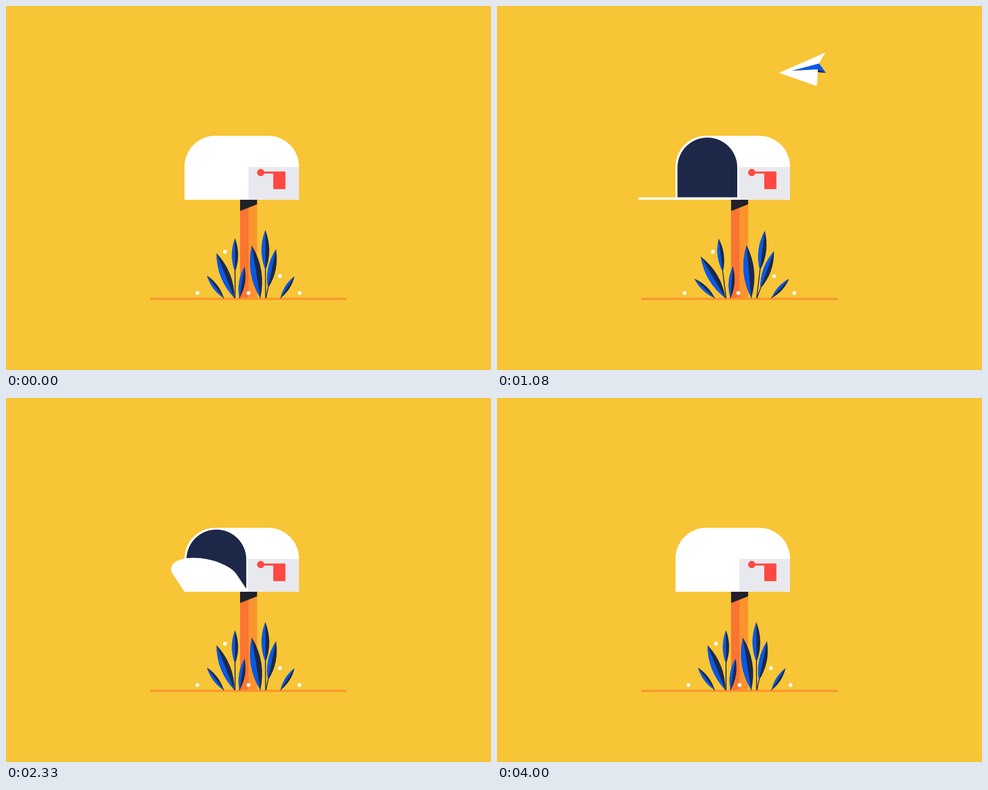
These frames come from a looping animation (864x648 px, 4.04 s). An HTML page with a canvas:

```html
<!DOCTYPE html>
<html lang="en">
<head>
<meta charset="utf-8">
<title>Mailbox</title>
<style>
  html, body { margin: 0; width: 100%; height: 100%; overflow: hidden; background: #f7c535; }
  canvas { display: block; }
</style>
</head>
<body>
<canvas id="stage" width="864" height="648"></canvas>
<script>
const ctx = document.getElementById('stage').getContext('2d');
const LOOP = 4040, GROUND = 520;
const YELLOW = '#f7c535', ORANGE = '#fb942f', RED = '#ff4842';
const BLUE = '#0759e8', NAVY = '#1d2849', WHITE = '#fff';

const rad = degrees => degrees * Math.PI / 180;
const ease = (t, from, to) => {
  const u = Math.min(1, Math.max(0, (t - from) / (to - from)));
  return u * u * (3 - 2 * u);
};

function fillPath(color, d) {
  ctx.fillStyle = color;
  ctx.fill(new Path2D(d));
}

function rect(color, x, y, w, h, radius = 0) {
  ctx.fillStyle = color;
  ctx.beginPath();
  ctx.roundRect(x, y, w, h, radius);
  ctx.fill();
}

function dot(color, x, y, r) {
  ctx.fillStyle = color;
  ctx.beginPath();
  ctx.arc(x, y, r, 0, 7);
  ctx.fill();
}

// Smooth curve through rows of [time, ...values]
function track(keys, t) {
  const last = keys.length - 1;
  const next = Math.max(1, keys.findIndex(k => k[0] >= t));
  const a = keys[next - 1], b = keys[next], span = b[0] - a[0];
  const u = (t - a[0]) / span;
  const slope = (k, c) => {
    const p = keys[Math.max(0, k - 1)], n = keys[Math.min(last, k + 1)];
    return (n[c] - p[c]) / (n[0] - p[0]) * span;
  };
  return [1, 2, 3].map(c => a[c] + ease(u, 0, 1) * (b[c] - a[c])
    + u * (1 - u) ** 2 * slope(next - 1, c) - u * u * (1 - u) * slope(next, c));
}

// time, x, y, heading
const FLIGHT = [
  [0, -75, 135, 18],
  [300, 340, 395, 30],
  [500, 589, 432, -18],
  [700, 760, 300, -75],
  [1080, 547, 115.5, -184.5],
  [1400, 260, 180, -198],
  [1560, 135, 238, -175],
  [1700, 57.5, 207, -47.3],
  [1900, 170, 170, 15],
  [2050, 315, 270, 28],
  [2160, 485, 305, 8]
];

// Nose at the origin, flying right; bank tilts it from a top view to a side view
function drawPlane(t) {
  const [x, y, heading] = track(FLIGHT, t);
  const flip = 1 - 2 * ease(t, 600, 1000);
  const bank = 1 - ease(t, 1080, 1700);
  const scale = .98 - .4 * ease(t, 1800, 2160);
  const upper = [-69 - 18 * bank, -29 - bank], lower = [-72 + 5 * bank, 30];
  const notch = [-71.5 - 2.5 * bank, -5 - 6 * bank], inner = [-71, 6.5 - 7 * bank];
  const keel = [-79 - 6 * bank, 6.7 * bank], fold = [-23, -1 - bank];
  ctx.save();
  ctx.translate(x, y);
  ctx.rotate(rad(heading));
  ctx.scale(scale, scale * flip);
  ctx.translate(45, 0);
  fillPath(BLUE, `M${fold}L${notch}L${keel}Z`);
  fillPath(NAVY, `M${fold}L${inner}L${keel}Z`);
  ctx.fillStyle = WHITE;
  ctx.beginPath();
  ctx.moveTo(0, 0);
  ctx.arcTo(...upper, ...notch, 3 * (1 - bank));
  ctx.lineTo(...notch);
  ctx.lineTo(...fold);
  ctx.lineTo(...inner);
  ctx.arcTo(...lower, 0, 0, 3);
  ctx.fill();
  ctx.restore();
}

// root x, tip x, tip y, share of the length that is bare stem
const LEAVES = [
  [388, 358, 480, 0], [407, 375, 440, 0], [408, 408, 413.5, .44], [416, 425, 464, 0],
  [453, 438, 426.5, 0], [462.5, 462, 399, .41], [463, 481, 433, .2], [489, 514, 481, 0]
];
const DOTS = [[390, 437.5], [341, 511], [432, 511], [488, 481], [523, 511]];

// Parts lean away from the post, more so further out
const lean = x => Math.sign(x - 434) * 9.8 * (Math.abs(x - 434) / 80) ** .3;

function drawLeaf([root, tipX, tipY, stem], amount) {
  const height = Math.hypot(tipX - root, GROUND - tipY);
  const length = height * (1 - stem), width = .22 * length - 2;
  const side = w => `M0,${-height * stem}Q${w},${-height + length / 2} 0,${-height}Z`;
  ctx.save();
  ctx.translate(root, GROUND);
  ctx.rotate(rad(lean(tipX) * amount) + Math.atan2(tipX - root, GROUND - tipY));
  rect(NAVY, -.8, -height * stem - 2, 1.6, height * stem + 2);
  fillPath(NAVY, side(width) + side(-width));
  fillPath(BLUE, side(-width));
  ctx.restore();
}

function swayAt(t) {
  const gust = start => ease(t, start, start + 320) - ease(t, start + 320, start + 740);
  return gust(720) + gust(2690);
}

function drawDoor(t) {
  const opening = ease(t, 400, 626), closing = ease(t, 2190, 2446);
  const open = opening - closing;
  const height = closing ? .03 + .97 * closing ** 1.2 : 1 - .97 * opening ** 2.2;
  ctx.save();
  ctx.translate(318, 344.7);
  ctx.transform(1, 0, .84 * open, height, 0, 0);
  fillPath(WHITE, 'M0,0V-57.5A56.5,56 0 0 1 113.5,-57.5V0Z');
  ctx.restore();
  if (open > .95) rect(WHITE, 251.5, 340.8, 180, 3.9, [1.5, 0, 0, 1.5]);
}

function drawFlag(t) {
  const angle = -102 * ease(t, 2820, 3090) + 16 * ease(t, 3090, 3290)
    - 4 * ease(t, 3290, 3600) + 90 * ease(t, 3800, 3995);
  ctx.save();
  ctx.translate(453.8, 296.5);
  ctx.rotate(rad(angle));
  dot(RED, 0, 0, 6.5);
  rect(RED, 0, -1.7, 43, 3.5);
  rect(RED, 22.3, -1.8, 21.7, 31.3, 1);
  ctx.restore();
}

function drawMailbox(t) {
  rect('#fa7432', 417, 344, 15, 176);
  rect(ORANGE, 432, 344, 15.3, 176);
  fillPath('#20202b', 'M417,344H447.3V353L417,365Z');
  rect(ORANGE, 257, 519.5, 350, 3.7);

  fillPath(WHITE, 'M318,344.7V286A55,55 0 0 1 373,231H467A55,55 0 0 1 522,286V344.7Z');
  rect('#e8e9ee', 431.5, 286.5, 90.5, 58.2);
  fillPath(NAVY, 'M321.5,340.8V287.5A53.2,53.2 0 0 1 428,287.5V340.8Z');
  if (t >= 1500 && t < 2160) {
    // The right-hand wall hides the plane once it is inside
    ctx.save();
    ctx.beginPath();
    ctx.rect(0, 0, 428, 648);
    ctx.clip();
    drawPlane(t);
    ctx.restore();
  }
  drawDoor(t);
  drawFlag(t);
}

function draw(t) {
  rect(YELLOW, 0, 0, 864, 648);
  if (t < 1500) drawPlane(t);
  drawMailbox(t);
  for (const leaf of LEAVES) drawLeaf(leaf, swayAt(t - 40));
  for (const [x, y] of DOTS) dot('#fffaea', x + .67 * lean(x) * swayAt(t), y, 3.4);
}

const start = performance.now();
function tick() {
  draw((performance.now() - start) % LOOP);
  requestAnimationFrame(tick);
}
tick();
</script>
</body>
</html>
```
